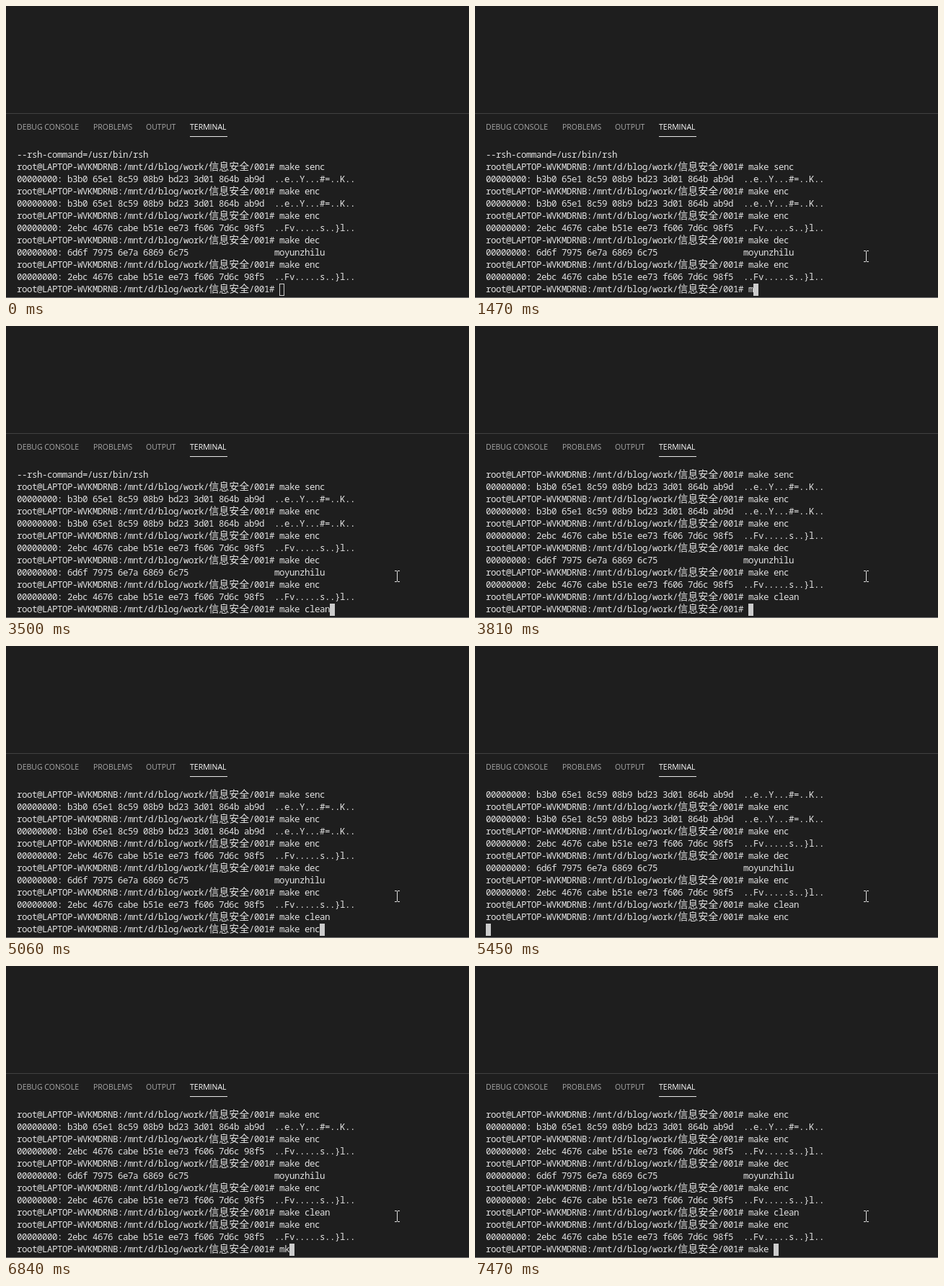
Write an HTML page with a canvas that moves like this. It is 642 px wide and 406 px high and loops after 8 s.

```html
<!DOCTYPE html>
<html lang="en">
<head>
<meta charset="utf-8">
<title>Terminal session</title>
<style>
  html, body { margin: 0; width: 100%; height: 100%; overflow: hidden; background: #1e1e1e; }
  canvas { display: block; }
</style>
</head>
<body>
<canvas id="stage" width="642" height="406"></canvas>
<script>
const ctx = document.getElementById('stage').getContext('2d');
const LOOP = 8000, LEFT = 15, TOP = 199, CELL = 7, ROW = 17, ROWS = 12;
const BACK = '#1e1e1e', CURSOR = '#cccccc', TEXT = '#e2e2e2';
const TAB = '#a8a8a8', ACTIVE_TAB = '#ffffff';
const MONO = '500 12.5px "Noto Sans Mono", monospace';
const WIDE = '14px "Noto Sans CJK SC", "Noto Sans CJK", sans-serif';

const PROMPT = 'root@LAPTOP-WVKMDRNB:/mnt/d/blog/work/信息安全/001# ';
const run = target => PROMPT + 'make ' + target;
const dump = (hex, text) => ('00000000: ' + hex).padEnd(51) + text;
const FIRST = dump('b3b0 65e1 8c59 08b9 bd23 3d01 864b ab9d', '..e..Y...#=..K..');
const SECOND = dump('2ebc 4676 cabe b51e ee73 f606 7d6c 98f5', '..Fv.....s..}l..');
const PLAIN = dump('6d6f 7975 6e7a 6869 6c75', 'moyunzhilu');

// Finished lines, each with the time it is committed
const history = [
  '--rsh-command=/usr/bin/rsh',
  run('senc'), FIRST,
  run('enc'), FIRST,
  run('enc'), SECOND,
  run('dec'), PLAIN,
  run('enc'), SECOND
].map(text => [0, text]);
history.push([3810, run('clean')], [5450, run('enc')], [5600, SECOND]);

// What stands on the command line from each time on
const typing = [
  [0, ''], [1470, 'm'], [1550, 'ma'], [1630, 'make'], [1790, 'make '],
  [2410, 'make c'], [2640, 'make ce'], [2870, 'make c'],
  [3180, 'make cl'], [3260, 'make cle'], [3340, 'make clea'], [3500, 'make clean'],
  [3810, ''], [4270, 'm'], [4350, 'ma'], [4430, 'mak'], [4510, 'make'], [4590, 'make '],
  [4750, 'make e'], [4900, 'make en'], [5060, 'make enc'], [5450, ''],
  [6140, 'm'], [6290, 'mka'], [6840, 'mk'], [7000, 'm'], [7150, 'ma'],
  [7310, 'mak'], [7390, 'make'], [7470, 'make ']
];

const POINTER_START = 300, POINTER_STEP = 78.5, FOCUS = 930;
const path = [[616, 400], [604, 378], [590, 358], [574, 342],
              [560, 333], [550, 331], [544, 338], [542, 348]];

function box(color, x, y, w, h) {
  ctx.fillStyle = color;
  ctx.fillRect(x, y, w, h);
}

function label(text, x, color) {
  ctx.font = '10.5px "Open Sans", sans-serif';
  ctx.textAlign = 'left';
  ctx.fillStyle = color;
  ctx.fillText(text, x, 172);
}

// Draws one line on the cell grid and returns the x after it
function line(text, y) {
  let x = LEFT;
  ctx.textAlign = 'center';
  ctx.fillStyle = TEXT;
  for (const ch of text) {
    const wide = ch > '\u2e80';
    const w = wide ? 2 * CELL : CELL;
    ctx.font = wide ? WIDE : MONO;
    ctx.fillText(ch, x + w / 2 + 0.3, y + 12);
    x += w;
  }
  return x;
}

function panel() {
  box(BACK, 0, 0, 642, 406);
  box('#414141', 0, 149, 642, 1);
  box('#777777', 0, 405, 642, 1);
  label('DEBUG CONSOLE', 15, TAB);
  label('PROBLEMS', 121, TAB);
  label('OUTPUT', 194, TAB);
  label('TERMINAL', 255, ACTIVE_TAB);
  box('#e7e7e7', 255, 181, 52, 1);
}

function terminal(t) {
  const waiting = t >= 5450 && t < 5680;
  const input = typing.findLast(([at]) => t >= at)[1];
  const lines = history.filter(([at]) => t >= at).map(([, text]) => text);
  lines.push(waiting ? '' : PROMPT + input);

  let x = LEFT;
  lines.slice(-ROWS).forEach((text, i) => x = line(text, TOP + i * ROW));
  const y = TOP + (ROWS - 1) * ROW;
  box(CURSOR, x, y, CELL, ROW);
  if (t < FOCUS) box(BACK, x + 1, y + 1, CELL - 2, ROW - 2);
}

function pointer(t) {
  const step = Math.floor((t - POINTER_START) / POINTER_STEP);
  if (step < 0) return;
  const [x, y] = path[Math.min(step, path.length - 1)];
  const color = '#e1e1e1';
  box(color, x, y - 7, 1, 14);
  for (const end of [y - 8, y + 7]) {
    box(color, x - 3, end, 3, 1);
    box(color, x + 1, end, 3, 1);
  }
}

function draw() {
  const t = performance.now() % LOOP;
  panel();
  terminal(t);
  pointer(t);
  requestAnimationFrame(draw);
}
draw();
</script>
</body>
</html>
```
